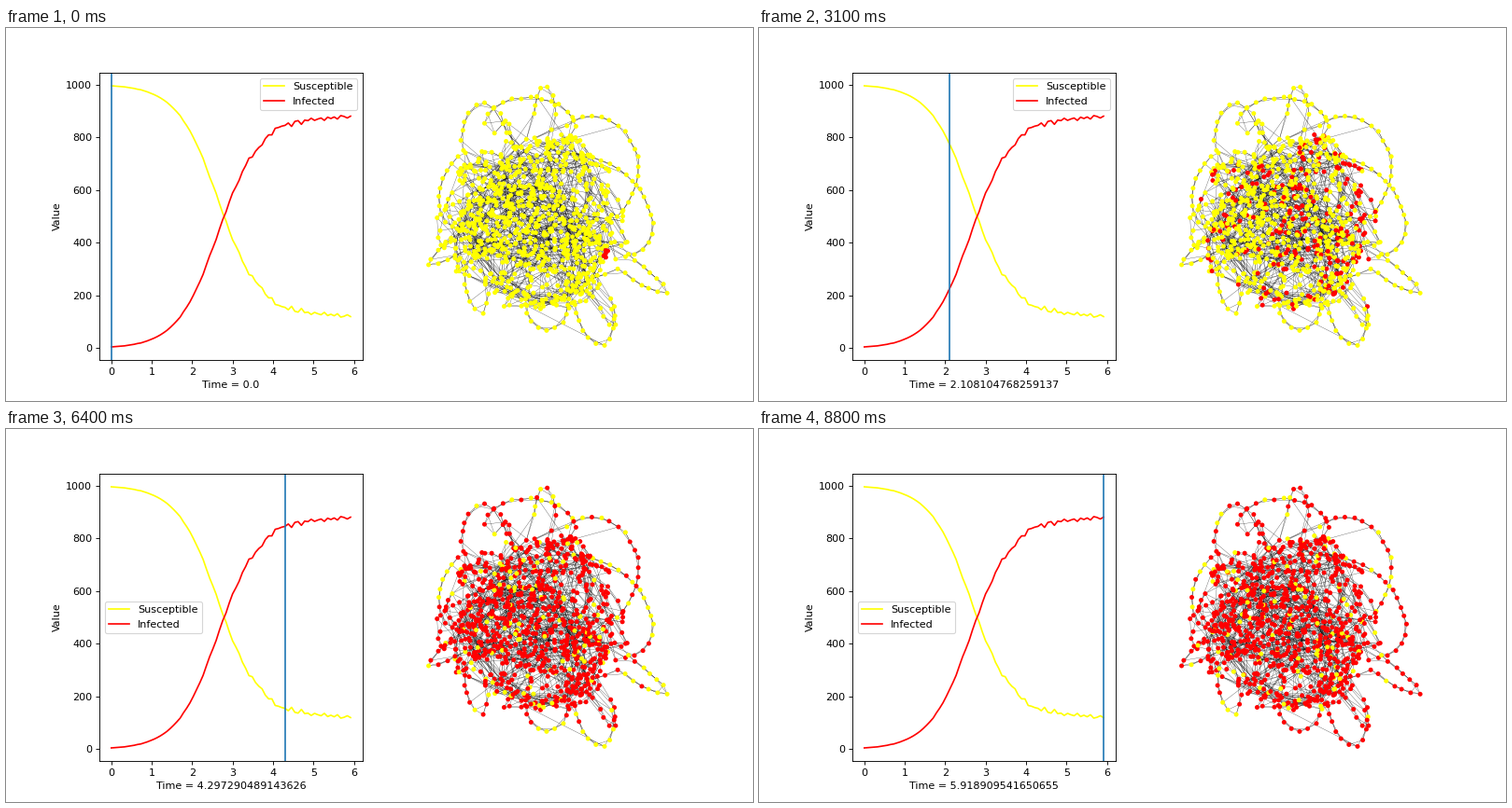
These frames come from a looping animation (800x400 px, 8.9 s). A matplotlib script:

```python
import math

import matplotlib.pyplot as plt
import numpy as np
from matplotlib.animation import FuncAnimation
from matplotlib.collections import LineCollection

N = 1000
FRAMES, STEP_MS = 89, 100
SEED_SPOT = np.array([643, 243])
rng = np.random.default_rng(11)

# Logistic epidemic with noise that grows with the count
TIMES = np.linspace(0, 5.999990494276006, 75)[:74]
trend = 876 / (1 + np.exp(5.16 - 1.95 * TIMES))
noise = rng.normal(0, 8, len(TIMES)).clip(-12, 12)
INFECTED = np.rint(trend + noise * trend / 876).astype(int)

# Outer loops of the network: start, tip and end in stage pixels
LOOPS = [
    [(489, 130), (506, 82), (535, 112)],
    [(513, 102), (562, 75), (610, 106)],
    [(566, 92), (577, 62), (588, 92)],
    [(600, 105), (669, 120), (654, 202)],
    [(598, 136), (684, 181), (663, 246)],
    [(666, 243), (708, 285), (655, 258)],
    [(648, 290), (652, 320), (636, 300)],
    [(608, 294), (635, 341), (650, 302)],
    [(556, 296), (579, 324), (602, 297)],
    [(492, 264), (503, 303), (517, 285)],
    [(478, 226), (452, 254), (490, 238)],
    [(494, 134), (464, 174), (480, 212)],
]


def loop_path(start, tip, end, spacing=10):
    """Half ellipse through the tip, sampled at even spacing."""
    start, tip, end = np.array([start, tip, end], float)
    mid = (start + end) / 2
    a = np.linspace(0, math.pi, 100)[:, None]
    curve = mid + (start - mid) * np.cos(a) + (tip - mid) * np.sin(a)
    dist = np.r_[0, np.cumsum(np.hypot(*np.diff(curve, axis=0).T))]
    s = np.linspace(0, dist[-1], round(dist[-1] / spacing) + 1)
    path = np.column_stack([np.interp(s, dist, c) for c in curve.T])
    return path + rng.normal(0, 0.7, path.shape)


def wander(n):
    """Smooth random path inside the central disc."""
    z = rng.normal(size=(n, 2))
    z = sum(math.exp(-(k / 4) ** 2) * np.roll(z, k, axis=0)
            for k in range(-12, 13))
    z = (z - z.mean(0)) / z.std(0)
    r = np.hypot(*z.T)[:, None]
    z = z / r * (1 - np.exp(-r ** 2 / 2)) ** 0.6
    return np.array([562, 206]) + z * [95, 98] + rng.normal(0, 2, (n, 2))


def build_ring():
    """One long chain that alternates outer loops and inner wandering."""
    loops = [loop_path(*p) for p in LOOPS]
    spare = N - sum(map(len, loops))
    walk = np.array_split(wander(spare), len(loops))
    pos, inner = [], []
    for i, (loop, gap) in enumerate(zip(loops, walk)):
        after = loops[(i + 1) % len(loops)][0]
        fade = np.exp(-np.arange(1, len(gap) + 1) / 5)[:, None]
        gap = gap + (loop[-1] - gap[0]) * fade + (after - gap[-1]) * fade[::-1]
        pos += [loop, gap]
        inner += [False] * len(loop) + [True] * len(gap)
    return np.vstack(pos), np.array(inner)


def build_edges(pos, inner):
    """Link each node to the next two, with some links rewired."""
    targets = np.flatnonzero(inner)
    edges = []
    for i in range(N):
        for step in (1, 2):
            j = (i + step) % N
            if rng.random() < (0.12 if inner[i] else 0.03):
                picks = rng.choice(targets, 2, replace=False)
                j = min(picks, key=lambda q: np.hypot(*(pos[q] - pos[i])))
            edges.append((i, j))
    return np.array(edges)


def spread(pos, edges, inner):
    """Infection and recovery over the links, following the counts."""
    links = np.zeros((N, N))
    links[edges[:, 0], edges[:, 1]] = links[edges[:, 1], edges[:, 0]] = 1
    far = np.hypot(*(pos - SEED_SPOT).T)
    ease = np.where(inner, 1, 0.3)
    sick = np.zeros(N, bool)
    sick[np.argsort(far)[:INFECTED[0]]] = True
    states = [sick]
    for k in range(1, len(INFECTED)):
        change = INFECTED[k] - sick.sum()
        heal = max(round(0.075 * sick.sum()), -change)
        healed = rng.choice(np.flatnonzero(sick), heal, replace=False)
        pool = np.flatnonzero(~sick)
        weight = (links @ sick + 0.03) * ease
        weight *= np.exp(-(far / (60 + 11 * k)) ** 2)
        weight = weight[pool] / weight[pool].sum()
        caught = rng.choice(pool, change + heal, replace=False, p=weight)
        sick = sick.copy()
        sick[healed] = False
        sick[caught] = True
        states.append(sick)
    return states


pos, inner = build_ring()
edges = build_edges(pos, inner)
states = spread(pos, edges, inner)

fig = plt.figure(figsize=(10, 5), dpi=80)
ax = fig.add_subplot(1, 2, 1)
ax.plot(TIMES, N - INFECTED, color="#ffff00", label="Susceptible")
ax.plot(TIMES, INFECTED, color="#ff0000", label="Infected")
ax.set_xlim(ax.get_xlim())
ax.set_ylim(ax.get_ylim())
ax.set_ylabel("Value")
marker = ax.axvline(0)
legend = ax.legend(loc="upper right")

net = fig.add_axes([0, 0, 1, 1])
net.set(xlim=(0, 800), ylim=(400, 0))
net.axis("off")
net.add_collection(LineCollection(pos[edges], colors="black", linewidths=0.3,
                                  alpha=0.75, zorder=1), autolim=False)
dots = net.scatter(*pos.T, s=20, linewidths=0, zorder=2)
COLORS = np.array([(1, 1, 0, 1), (1, 0, 0, 1)], float)


def update(frame):
    # Each step lasts 120 ms, shown on a 100 ms clock
    k = math.ceil(frame * 5 / 6 - 0.5)
    marker.set_xdata([TIMES[k]] * 2)
    ax.set_xlabel(f"Time = {TIMES[k]}")
    # The legend moves away once the marker reaches it
    legend.set_loc("upper right" if k < 46 else "center left")
    dots.set_facecolor(COLORS[states[k].astype(int)])
    return marker, dots


anim = FuncAnimation(fig, update, frames=FRAMES, interval=STEP_MS,
                     repeat=True, repeat_delay=0)
plt.show()
```
